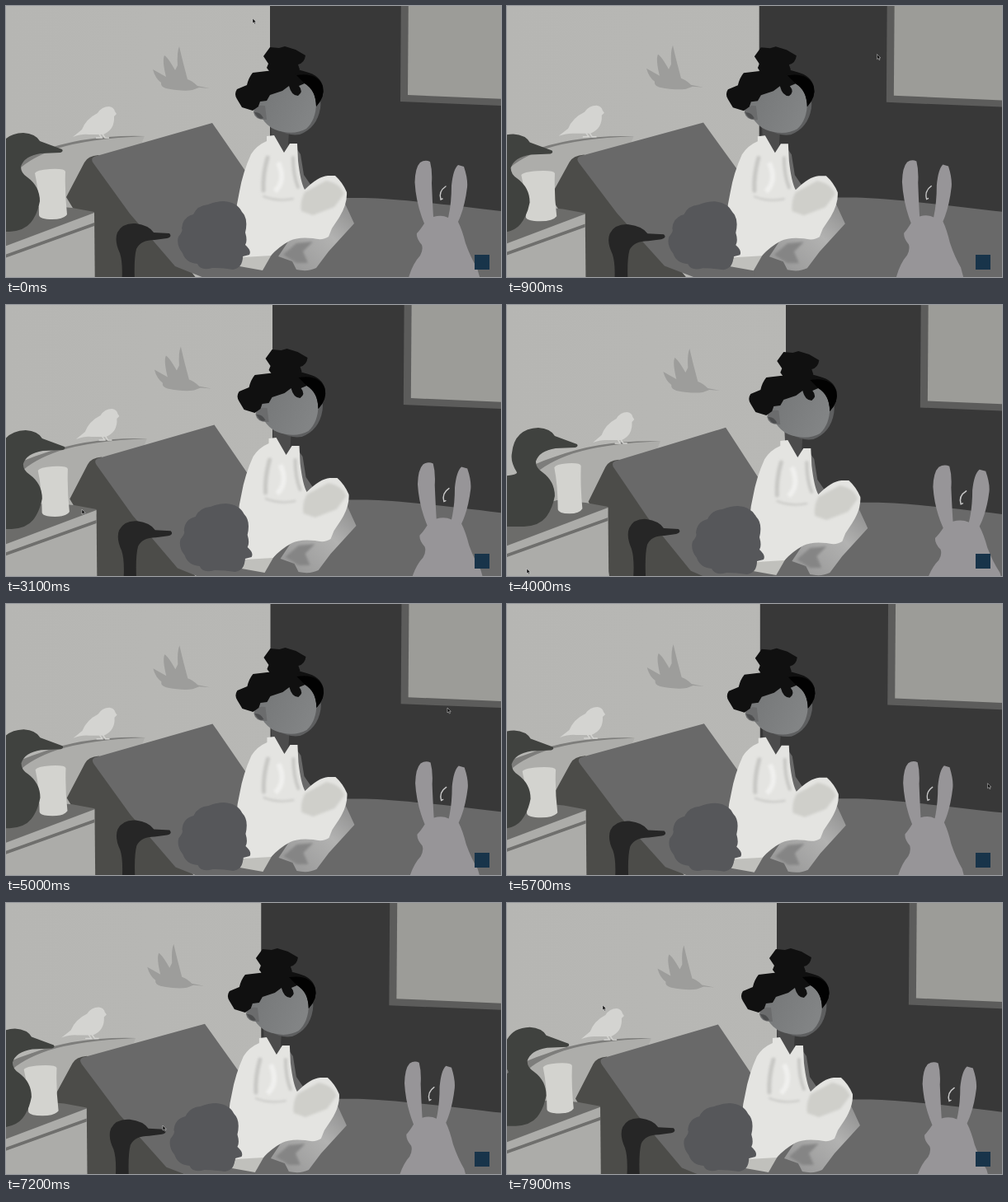
Recreate the animation shown at these times as an HTML page. Size 600 by 329 pixels, loop 8 s.

```html
<!DOCTYPE html>
<html lang="en">
<head>
<meta charset="utf-8">
<title>Bedroom parallax</title>
<style>
html, body { margin: 0; width: 100%; height: 100%; overflow: hidden; background: #b6b6b3; }
svg { display: block; width: 100vw; height: 100vh; }
</style>
</head>
<body>
<svg viewBox="0 0 600 329" preserveAspectRatio="none">
  <defs>
    <linearGradient id="plaster"><stop stop-color="#b6b6b3"/><stop offset="1" stop-color="#b8b8b5"/></linearGradient>
    <linearGradient id="skin" x1="0" x2="1" y1="0" y2=".4"><stop stop-color="#747677"/><stop offset="1" stop-color="#828485"/></linearGradient>
    <linearGradient id="shin" x1="0" x2="1" y1="1" y2="0"><stop stop-color="#949494"/><stop offset=".6" stop-color="#b2b2b1"/><stop offset="1" stop-color="#8c8c8c"/></linearGradient>
    <filter id="soft" x="-50%" y="-50%" width="200%" height="200%"><feGaussianBlur stdDeviation="1.8"/></filter>
  </defs>

  <rect width="350" height="329" fill="url(#plaster)"/>

  <g id="swift">
    <path fill="#9d9d9b" d="M247 100 L232 97 Q226 91 220 89 L215 70 Q212 58 210 49 Q207 56 208 72 L205 78 Q196 62 192 60 Q189 66 194 86 L178 77 Q181 88 188 93 Q187 98 194 100 Q214 104 226 102 L234 99Z"/>
  </g>

  <g id="wall"><path fill="#383838" d="M320 -30H700V360H320Z"/></g>

  <g id="window">
    <path fill="#5c5c5b" d="M479 -30 L478 116 L700 125 V-30Z"/>
    <path fill="#9c9c98" d="M488 -30 L487 108 L700 117 V-30Z"/>
  </g>

  <g id="headboard">
    <path fill="#adadaa" d="M-40 215 Q0 190 40 177 Q100 157 168 158 L150 200 L110 300 H-40Z"/>
    <path fill="#7d7d7b" d="M-40 217 Q5 188 40 177 Q95 156 168 158 Q100 161 62 173 Q30 184 15 199 L-40 232Z"/>
  </g>

  <g id="sparrow">
    <path fill="#d4d4d1" d="M81 159 L92 150 Q97 137 111 130 Q116 122 125 122 Q131 123 132 128 L134 131 L131 134 Q132 150 118 156 L100 156 Q92 155 81 159Z"/>
    <path fill="none" stroke="#d4d4d1" stroke-width="1.5" d="M112 154 L116 160 H109 M116 154 L120 160 H125"/>
  </g>

  <g id="floor">
    <path fill="#696969" d="M240 350 L290 233 H435 Q480 234 600 249 L700 258 V360 H240Z"/>
  </g>

  <g id="mattress">
    <path fill="#4c4c49" d="M112 181 Q99 182 95 190 L73 232 L90 260 L109 380 H270Z"/>
    <path fill="#696969" d="M250 142 L110 182 Q101 184 106 191 L150 252 L205 316 L245 332 V360 H310 V228 L290 200Z"/>
  </g>

  <g id="girl">
    <path fill="#4c4c4c" d="M321 144 L343 152 L342 170 L337 179 L322 164Z"/>
    <path fill="#696969" d="M350 170 L357 180 L361 205 L372 221 L356 230Z"/>
    <path fill="url(#shin)" d="M411 240 L422 264 L391 298 L376 318 Q366 323 352 320 L347 310 L330 304 L346 280 L385 270Z"/>
    <path fill="#858585" filter="url(#soft)" d="M352 288 L372 286 L360 298 L366 312 L352 312 L336 302Z"/>
    <path fill="#c0c0bc" d="M290 298 L323 300 L311 321 L283 316Z"/>
    <path fill="#e4e4e1" d="M316 158 L325 157 L337 178 L344 167 L353 167 L354 188 Q357 214 362 223 Q378 207 390 206 L399 206 Q408 214 413 226 Q414 241 403 258 L395 270 L391 280 Q384 285 372 282 Q354 280 344 285 Q331 292 321 303 L287 305 Q291 298 279 265 Q278 245 283 225 Q287 202 297 180 Q304 169 316 164Z"/>
    <path fill="#cfcfca" filter="url(#soft)" d="M362 226 L388 212 Q405 215 410 228 L398 244 L372 254 L358 249 Q356 238 362 226Z"/>
    <g fill="none" stroke="#c7c7c4" stroke-linecap="round" filter="url(#soft)">
      <path stroke-width="5" d="M317 184 Q311 205 312 224"/>
      <path stroke-width="4" d="M348 184 Q348 205 354 220"/>
      <path stroke-width="2" d="M312 231 Q330 238 348 234"/>
    </g>
    <path fill="none" stroke="#f0f0ee" stroke-width="6" filter="url(#soft)" d="M330 190 Q340 212 326 225"/>
    <path fill="#5e5f60" d="M364 92 Q384 102 381 124 Q377 148 356 156 Q342 158 330 150Z"/>
    <path fill="url(#skin)" d="M306 118 L309 134 Q316 146 326 150 Q348 158 364 149 Q376 138 376 117 Q374 100 361 91 H330Z"/>
    <path fill="#6b6c6d" d="M314 121 Q300 119 300 129 Q302 139 316 138Z"/>
    <path fill="#4c4d4e" d="M301 129 Q308 128 312 136 Q306 139 301 129Z"/>
    <path fill="#101010" d="M316 79 L299 81 Q294 87 292 96 L280 101 Q276 107 280 113 L286 123 L299 127 L306 122 L308 116 L316 115 L320 108 L335 103 L343 97 Q346 109 354 109 Q361 104 355 97 L362 94 Q375 100 376 122 Q387 110 384 97 Q380 84 364 80 L350 76Z"/>
    <path fill="#101010" d="M312 61 L320 50 L331 51 L338 49 L351 53 L363 60 Q362 69 354 71 L356 77 L351 83 H322 L316 75 L318 70Z"/>
    <path fill="#020202" d="M352 84 Q378 80 384 98 Q387 110 376 122 Q376 103 362 94Z"/>
  </g>

  <g id="bush">
    <path fill="#56575a" d="M264 237 Q280 238 286 250 Q294 258 290 275 Q293 285 290 290 Q298 297 295 302 L287 304 Q287 318 275 320 Q262 318 250 318 Q236 322 232 313 Q218 312 214 300 Q206 290 209 280 Q215 273 213 270 Q214 256 227 253 Q232 242 245 241 Q255 237 264 237Z"/>
  </g>

  <g id="table">
    <path fill="#6c6c6a" d="M-60 300 L20 250 L45 242 L80 245 L107 250 V256 L-60 318Z"/>
    <path fill="#acaca9" d="M-60 314 L107 251 L108 360 H-60Z"/>
    <path fill="#6f6f6d" d="M-60 323 L107 263 V267 L-60 327Z"/>
  </g>

  <g id="cup">
    <path fill="#d3d3cf" d="M35 203 Q37 199 53 198 Q71 197 72 201 Q71 225 74 253 Q70 259 56 259 Q41 259 40 254 Q40 225 35 203Z"/>
  </g>

  <g id="duck">
    <path fill="#40423f" transform="translate(-16 5)" d="M-40 208 Q14 209 11 203 Q3 190 5 180 Q8 150 37 149 Q52 150 57 159 L84 169 Q86 172 82 173 L58 174 Q38 177 34 190 Q34 198 42 203 Q57 214 57 232 Q54 248 46 258 Q38 268 20 269 H-40Z"/>
  </g>

  <g id="gosling">
    <path fill="#262626" d="M139 350 Q143 315 138 300 Q131 285 135 275 Q141 263 157 264 Q173 266 179 275 L198 276 Q202 280 195 282 L180 284 Q163 284 158 295 Q154 310 157 350Z"/>
  </g>

  <g id="rabbit">
    <path fill="#979598" d="M484 350 Q488 318 502 303 Q506 296 504 290 Q497 282 498 276 Q502 272 507 264 Q497 240 495.500 214 Q496 196 502 190 Q508 186 514 189 Q517 200 516 215 Q517 240 518 256 Q528 253 536 257 Q540 240 540 218 Q542 198 548 193 L555 195 Q560 210 559 220 Q556 245 548 262 Q553 272 557 288 Q563 305 571 318 L580 350Z"/>
    <path fill="none" stroke="#c9c9c9" stroke-width="1.4" stroke-linecap="round" d="M533 219 Q524 225 527 235 L529 234"/>
  </g>

  <rect x="568" y="302" width="18" height="18" fill="#18344a"/>

  <g id="pointer">
    <path fill="#0a0a0a" stroke="#dcdcdc" stroke-width=".5" d="M0 0 V6 L1.4 4.8 L2.4 7 L3.4 6.5 L2.5 4.4 H4.2Z"/>
  </g>
</svg>
<script>
const LOOP = 8000, STEP = 100;

// Per layer: horizontal depth, vertical drift per sway, vertical depth,
// then for things that turn in depth: widening per sway and the x it keeps
const layers = {
  swift: [.63, .1, .3], wall: [1, 0, 0], window: [1.27, -.03, 1.3],
  headboard: [1, .02, 1], sparrow: [1.13, .1, .9, -.003, 133],
  floor: [.84, .05, .85], mattress: [.84, .05, .85, -.0033, 250],
  girl: [.85, 0, 1], bush: [.89, 0, 1], table: [.86, -.11, -.43],
  cup: [.98, -.16, -.4, -.007, 72], duck: [.94, -.11, -.43],
  gosling: [.55, -.09, -.35, -.0027, 200], rabbit: [1.16, .05, .85, .004, 495]
};

// Keys: seconds, value, value
const sway = [[0, 0, 0], [1.8, -22.5, 1], [3.1, 3, 4], [4, 18, 7], [5, .5, 4], [6.5, -22, 6], [7.9, 7, 6]];
const path = [[0, 299, 15], [1.8, 558, 123], [2.4, 430, 270], [3.1, 92, 248], [4, 24, 320],
  [4.5, 180, 90], [5, 535, 126], [5.8, 575, 230], [6.5, 418, 302], [7.2, 190, 270], [7.9, 116, 124]];

function slope(keys, i, c) {
  const a = keys[Math.max(i - 1, 0)], b = keys[Math.min(i + 1, keys.length - 1)];
  return (b[c] - a[c]) / (b[0] - a[0]);
}

function sample(keys, t) {
  let i = 0;
  while (i < keys.length - 2 && t >= keys[i + 1][0]) i++;
  const a = keys[i], b = keys[i + 1], span = b[0] - a[0], u = Math.min((t - a[0]) / span, 1);
  return [1, 2].map(c => {
    const rise = u * u * (3 - 2 * u);
    return a[c] + (b[c] - a[c]) * rise
      + span * u * (1 - u) * ((1 - u) * slope(keys, i, c) - u * slope(keys, i + 1, c));
  });
}

function place(id, x, y, widen = 0, pivot = 0) {
  document.getElementById(id).setAttribute('transform',
    `matrix(${1 + widen} 0 0 1 ${x - widen * pivot} ${y})`);
}

function draw(now) {
  const t = Math.floor((now % LOOP) / STEP) * STEP / 1000;
  const [p, q] = sample(sway, t);
  for (const [id, [depth, drift, lift, widen = 0, pivot]] of Object.entries(layers))
    place(id, depth * p, drift * p + lift * q, widen * p, pivot);
  place('pointer', ...sample(path, t));
}

function tick() {
  draw(performance.now());
  requestAnimationFrame(tick);
}
tick();
</script>
</body>
</html>
```
